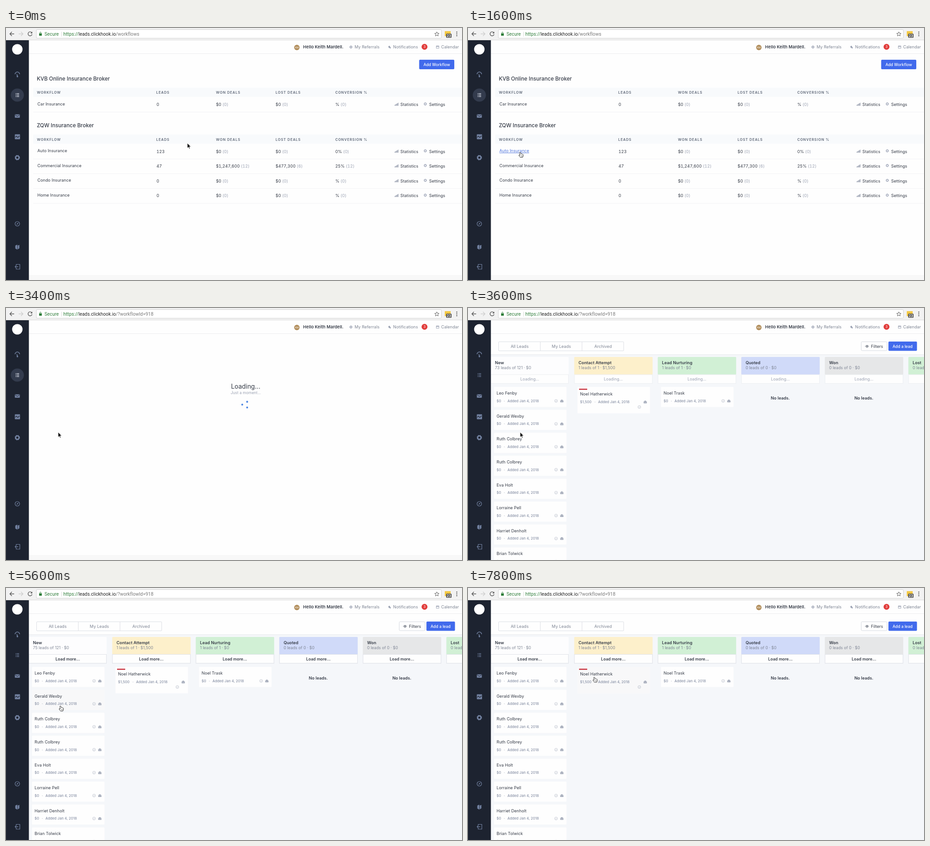
These frames come from a looping animation (1006 by 556 pixels, 8 s). An HTML page:

```html
<!DOCTYPE html>
<html lang="en">
<head>
<meta charset="utf-8">
<title>Lead workflows</title>
<style>
html, body { margin: 0; width: 100%; height: 100%; overflow: hidden; background: #fefefe; }
svg { display: block; width: 1006px; height: 556px; }
text { font-family: Inter, "Open Sans", sans-serif; font-size: 9.1px; letter-spacing: .05px; fill: #343a46; white-space: pre; }
.mid { text-anchor: middle; }
.bold { font-weight: 600; }
.grey { fill: #7d8493; }
.pale { fill: #9aa1b2; }
.white { fill: #fff; }
.num { font-variant-numeric: tabular-nums; }
.url { font-family: Roboto, sans-serif; font-size: 10.2px; letter-spacing: .06px; fill: #777; }
.secure { fill: #2e7d3a; }
.host { fill: #222; }
.hello { font-size: 9.4px; }
.badge { font-size: 7.5px; }
.tiny { font-size: 5.2px; }
.h1 { font-size: 13.8px; }
.h2 { font-size: 11.6px; font-weight: 500; }
.th { font-size: 7.6px; font-weight: 600; letter-spacing: .9px; fill: #5d6676; }
.small { font-size: 8.8px; }
.note { font-size: 8.4px; }
.count { font-size: 8.7px; }
.meta { font-size: 7.7px; font-weight: 500; fill: #8790a5; }
.btn { font-size: 8.6px; font-weight: 500; }
.hot { fill: #4a70dc; text-decoration: underline; }
.line { fill: none; stroke: #71809f; stroke-width: 1.2; }

.anim { animation: 8s step-end infinite; }
.list { animation-name: list; }
.wait { animation-name: wait; }
.board { animation-name: board; }
.before { animation-name: before; }
.after { animation-name: after; }
.hold { animation-name: hold; }
.ready { animation-name: ready; }
.newHold { animation-name: newHold; }
.newReady { animation-name: newReady; }
.link { animation-name: link; }
.card1 { animation-name: card1; }
.card0 { animation-name: card0; }
.cardC { animation-name: cardC; }
.arrow { animation-name: arrow; }
.hand { animation-name: hand; }
@keyframes list { 0% { opacity: 1 } 25%, 100% { opacity: 0 } }
@keyframes wait { 0% { opacity: 0 } 25% { opacity: 1 } 45%, 100% { opacity: 0 } }
@keyframes board { 0% { opacity: 0 } 45%, 100% { opacity: 1 } }
@keyframes before { 0% { opacity: 1 } 45%, 100% { opacity: 0 } }
@keyframes after { 0% { opacity: 0 } 25%, 100% { opacity: 1 } }
@keyframes hold { 0% { opacity: 1 } 50%, 100% { opacity: 0 } }
@keyframes ready { 0% { opacity: 0 } 50%, 100% { opacity: 1 } }
@keyframes newHold { 0% { opacity: 1 } 65%, 100% { opacity: 0 } }
@keyframes newReady { 0% { opacity: 0 } 65%, 100% { opacity: 1 } }
@keyframes link { 0% { opacity: 0 } 15%, 100% { opacity: 1 } }
@keyframes card1 { 0% { opacity: 0 } 60% { opacity: 1 } 80%, 100% { opacity: 0 } }
@keyframes card0 { 0% { opacity: 0 } 80% { opacity: 1 } 95%, 100% { opacity: 0 } }
@keyframes cardC { 0% { opacity: 0 } 95%, 100% { opacity: 1 } }
@keyframes arrow { 0% { opacity: 1 } 15% { opacity: 0 } 25% { opacity: 1 } 60%, 100% { opacity: 0 } }
@keyframes hand { 0% { opacity: 0 } 15% { opacity: 1 } 25% { opacity: 0 } 60%, 100% { opacity: 1 } }

.spin { animation: spin 8s steps(40) infinite; }
@keyframes spin { from { transform: rotate(-9deg) } to { transform: rotate(2871deg) } }

.pointer { animation: move 8s step-end infinite; }
@keyframes move {
  0% { transform: translate(400px, 254px); animation-timing-function: steps(3) }
  7.5% { transform: translate(215px, 270px); animation-timing-function: steps(3) }
  15% { transform: translate(104px, 273px); animation-timing-function: steps(2) }
  20% { transform: translate(115px, 274px) }
  57.5% { transform: translate(115px, 274px) }
  60% { transform: translate(113px, 252.5px); animation-timing-function: steps(4) }
  70% { transform: translate(120px, 260px) }
  72.5% { transform: translate(120px, 260px); animation-timing-function: steps(4) }
  82.5% { transform: translate(119.5px, 194.5px) }
  87.5% { transform: translate(119.5px, 194.5px); animation-timing-function: steps(2) }
  92.5% { transform: translate(205px, 196px) }
  95% { transform: translate(262px, 197px) }
  97.5%, 100% { transform: translate(278.5px, 196.5px) }
}
</style>
</head>
<body>
<svg id="stage" xmlns="http://www.w3.org/2000/svg" width="1006" height="556"></svg>
<script>
const text = (x, y, s, cls = '') => `<text x="${x}" y="${y}" class="${cls}">${s}</text>`;
const rect = (x, y, w, h, fill, more = '') =>
  `<rect x="${x}" y="${y}" width="${w}" height="${h}" fill="${fill}" ${more}/>`;
const disc = (x, y, r, fill, more = '') => `<circle cx="${x}" cy="${y}" r="${r}" fill="${fill}" ${more}/>`;
const path = (d, more = 'class="line"') => `<path d="${d}" ${more}/>`;
const stroke = (color, width = 1) => `fill="none" stroke="${color}" stroke-width="${width}"`;
const fill = color => `fill="${color}"`;
const at = (x, y, s) => `<g transform="translate(${x} ${y})">${s}</g>`;
const anim = (name, s) => `<g class="anim ${name}">${s}</g>`;
const gear = (x, y, r, c) => at(x, y,
  disc(0, 0, r * .68, 'none', `stroke="${c}" stroke-width="${r * .5}"`) +
  disc(0, 0, r * .88, 'none', `stroke="${c}" stroke-width="${r * .3}" stroke-dasharray="${r * .35}"`));

function toolbar() {
  const ink = '#5a5a5a', green = '#2e7d3a';
  const dots = [9, 13, 17].map(y => disc(994.5, y, 1.2, ink)).join('');
  const host = '<tspan class="secure">https://</tspan><tspan class="host">leads.clickhook.io</tspan>';
  return rect(0, 0, 1006, 27, '#f2f2f2') + rect(0, 26, 1006, 1, '#d9d9d9') +
    rect(67, 3.5, 893.5, 19, '#fff', 'rx="2" stroke="#d2d2d2"') +
    path('M18 13H9M13 8.5L8.5 13L13 17.5', stroke(ink, 1.4)) +
    path('M28 13H37M33 8.5L37.5 13L33 17.5', stroke('#cfcfcf', 1.4)) +
    path('M56.6 10A4.5 4.5 0 1 0 57.5 14', stroke(ink, 1.4)) + path('M58 8V12H54Z', fill(ink)) +
    rect(73, 12, 6, 5, green, 'rx=".5"') +
    path('M74.5 12V10.5A1.5 1.5 0 0 1 77.5 10.5V12', stroke(green)) +
    text(85, 17, 'Secure', 'url secure') + rect(122, 8, 1, 11, '#ddd') +
    anim('list', text(126.5, 17, host + '/workflows', 'url')) +
    anim('after', text(126.5, 17, host + '/?workflowId=918', 'url')) +
    path('M950.5 8.5L951.9 11.7L955.3 12L952.7 14.3L953.5 17.6L950.5 15.8L947.5 17.6L948.3 14.3L945.7 12L949.1 11.7Z',
      stroke(ink)) +
    rect(968, 7, 13, 11, '#f3c945') + rect(971, 12.5, 12, 9, '#555', 'rx="1.5"') +
    text(977, 19.8, '23', 'mid white bold badge') + dots;
}

function sidebar() {
  const c = '#71809f', back = '#1d2330';
  const rows = color => [144.7, 148, 151.3].map(y =>
    rect(21, y - .6, 1.5, 1.3, color) + rect(23.5, y - .6, 5.5, 1.3, color)).join('');
  return rect(0, 27, 50.5, 529, back) + disc(25, 47, 11.5, '#fff') +
    path('M20 102A5 5 0 0 1 30 102', stroke(c, 1.6)) +
    path('M23.5 100L26.5 106A1.7 1.7 0 1 1 23.8 106Z', fill(c)) +
    rows(c) + anim('before', disc(25, 148, 14.5, '#333b4d') + rows('#e4e8f2')) +
    rect(19.5, 190.5, 11, 7.5, c, 'rx="1"') + path('M20 191.5L25 195L30 191.5', stroke(back)) +
    rect(19.5, 234.5, 11.5, 11, c, 'rx="1"') +
    path('M20.5 241L23 238.5L26 241.5L30 238', stroke(back, 1.2)) +
    gear(25, 286, 5.6, c) +
    disc(25, 432, 5, 'none', 'class="line"') + path('M23 434.5L24.5 431L27.5 429.5L26 432.5Z', fill(c)) +
    path('M20.5 480L25 478V489L20.5 486.5Z', fill(c)) +
    path('M25.8 480L29.5 478.5V486L25.8 488.5Z', fill(c)) +
    path('M22.5 524.5V521.5H30.5V532H22.5V529M20 526.7H27M22.3 524.3L20 526.7L22.3 529');
}

function header() {
  const c = '#9aa1b2';
  return rect(50, 56, 956, 1, '#ececee') +
    disc(641.7, 43, 6, '#b28e5c') + text(641.7, 45, 'KM', 'mid white tiny') +
    text(655.5, 45.3, 'Hello Keith Mardell.', 'bold hello') +
    gear(761, 42, 3, c) + text(769, 45.3, 'My Referrals', 'grey') +
    path('M844 43.5L843.5 40.5L846 39L848 42L849 44Z', fill(c)) + disc(847.5, 44, 1.2, c) +
    text(854, 45.3, 'Notifications', 'grey') +
    disc(923.3, 41.5, 6.5, '#e13c3a') + text(923.3, 44.3, '3', 'mid white badge') +
    rect(949.3, 39.7, 5.7, 5, 'none', `stroke="${c}" stroke-width=".9"`) + rect(949, 39.5, 6, 1.7, c) +
    text(960, 45.3, 'Calendar', 'grey');
}

// Left edges of the numeric table columns
const colX = i => 200 + i * 131.6;

function row(y, name, leads, ...deals) {
  const pair = ([a, b], i) =>
    text(colX(i + 2), y + 3.5, `${a} <tspan class="pale">(${b})</tspan>`, 'num');
  return text(69.3, y + 2.2, name) + text(colX(1) + .4, y + 3.5, leads, 'num') + deals.map(pair).join('') +
    path(`M857 ${y + 3}V${y + 1.5}L866 ${y - 4}V${y + 3}Z`, fill('#b3b8c4')) +
    text(870, y + 3.5, 'Statistics') + gear(925, y - 1, 3.3, '#a9b0c0') + text(933.5, y + 3.5, 'Settings') +
    rect(60, y + 16.5, 946, 1, '#f1f2f5');
}

function table(y, title) {
  const heads = ['LEADS', 'WON DEALS', 'LOST DEALS', 'CONVERSION %'];
  return text(68, y, title, 'h2') + rect(60, y + 16, 946, 20, '#f8fafc') +
    text(68.3, y + 29.3, 'WORKFLOW', 'th') +
    heads.map((h, i) => text(colX(i + 1), y + 29.3, h, 'th')).join('');
}

function workflows() {
  const none = ['$0', 0], blank = ['%', 0];
  return rect(911.5, 70, 77.5, 21, '#416aec', 'rx="2"') + text(950.3, 84, 'Add Workflow', 'btn mid white') +
    table(115.8, 'KVB Online Insurance Broker') + row(168.5, 'Car Insurance', 0, none, none, blank) +
    table(219.2, 'ZQW Insurance Broker') +
    row(272, 'Auto Insurance', 123, none, none, ['0%', 0]) +
    row(304.4, 'Commercial Insurance', 47, ['$1,247,600', 12], ['$477,300', 6], ['25%', 12]) +
    row(337.2, 'Condo Insurance', 0, none, none, blank) +
    row(369.8, 'Home Insurance', 0, none, none, blank) +
    anim('link', rect(68, 264, 70, 13, '#fefefe') + text(69.3, 274.2, 'Auto Insurance', 'hot'));
}

function loading() {
  const dots = [15, 135, 255].map(a => `<g transform="rotate(${a})">${disc(0, -7.2, 2, '#3c7be0')}</g>`).join('');
  return text(528.8, 177.7, 'Loading...', 'mid h1') + text(529, 189.8, 'Just a moment...', 'mid pale note') +
    at(528.4, 213.2, `<g class="spin">${dots}</g>`);
}

const tick = (x, y) => at(x, y, disc(0, 0, 3.1, 'none', 'stroke="#b3b9c6" stroke-width=".8"') +
  path('M-1.3 0L-.2 1L1.4 -.8', stroke('#b3b9c6', .8)));
const mail = (x, y) => at(x, y, path('M-3.5 -1L0 -3L3.5 -1V3H-3.5Z', fill('#9da4b4')) +
  path('M-3.3 -.5L0 1L3.3 -.5', stroke('#fff', .6)));

function panel(x, y, h, hover) {
  const box = color => rect(x, y, 160, h, color, 'rx="1.5"');
  return box('#fefefe') + (hover ? anim(hover, box('#f8f8f9')) : '');
}

function card(x, y, name, hover) {
  return panel(x, y, 44.5, hover) +
    text(x + 5.7, y + 17.2, name) + text(x + 5.7, y + 33.8, '$0', 'meta') +
    text(x + 21.7, y + 33.8, '·', 'meta') + text(x + 29.7, y + 33.8, 'Added Jan 4, 2018', 'meta') +
    tick(x + 137, y + 31) + mail(x + 149.7, y + 31);
}

function column(i, title, count, color) {
  const x = 50 + i * 184.3, w = i ? 173 : 172, cx = x + 86.3, first = i === 0;
  const sub = s => text(x + 9.5, 135.3, s, 'grey count');
  const [hold, ready] = first ? ['newHold', 'newReady'] : ['hold', 'ready'];
  return rect(x, 108, w, 39, color, 'rx="1.5"') + text(x + 9.5, 123.6, title, 'bold') +
    (first ? anim(hold, sub('73' + count)) + anim(ready, sub('75' + count)) : sub(count)) +
    rect(x + .5, 147, w - 1, 19.5, '#fefefe', 'stroke="#eceef2"') +
    anim(hold, text(cx, 159.6, 'Loading...', 'small mid pale')) +
    anim(ready, rect(x + .5, 146.5, w - 1, 19.5, '#fefefe', 'stroke="#dfe2e8"') +
      text(cx, 159.6, 'Load more...', 'small mid bold'));
}

function leads() {
  const names = ['Leo Fenby', 'Gerald Wexby', 'Ruth Colbrey', 'Ruth Colbrey', 'Eva Holt', 'Lorraine Pell',
    'Harriet Denholt', 'Brian Tolwick'];
  const hovers = ['card0', 'card1'];
  const edge = '#dcdfe5';
  const columns = [
    ['New', ' leads of 121 · $0', '#fdfdfe'],
    ['Contact Attempt', '1 leads of 1 · $1,500', '#fdf0cb'],
    ['Lead Nurturing', '1 leads of 1 · $0', '#d1f0d5'],
    ['Quoted', '0 leads of 0 · $0', '#d0daf9'],
    ['Won', '0 leads of 0 · $0', '#e6e7e8'],
    ['Lost', '0 leads of 0 · $0', '#d1f0d5']];
  return rect(50, 57, 956, 46, '#fefefe') + rect(50, 103, 956, 453, '#f5f7fa') + rect(50, 102.5, 956, 1, '#e6e8ec') +
    rect(67.5, 74.5, 276, 20, '#fefefe', `rx="1.5" stroke="${edge}"`) +
    rect(159, 74.5, 1, 20, edge) + rect(251, 74.5, 1, 20, edge) +
    ['All Leads', 'My Leads', 'Archived'].map((s, i) => text(114 + i * 92, 87.8, s, 'mid grey')).join('') +
    rect(867.5, 74.5, 57, 19.5, '#fefefe', 'rx="2" stroke="#d5d9e0"') +
    path('M876.5 84.5Q880.3 80 884 84.5Q880.3 89 876.5 84.5Z', stroke('#555c6a')) +
    disc(880.3, 84.5, 1.3, '#555c6a') + text(889, 87.7, 'Filters') +
    rect(927.5, 74, 63, 20.5, '#416aec', 'rx="2"') + text(958.8, 87.6, 'Add a lead', 'btn mid white') +
    columns.map((c, i) => column(i, ...c)).join('') +
    names.map((n, i) => card(57.3, 174 + i * 50.6, n, hovers[i])).join('') +
    panel(241.5, 174, 58.5, 'cardC') +
    rect(245, 178, 18, 2.5, '#c9333f') + text(247.2, 193.3, 'Noel Hatherwick') +
    text(247.2, 209.9, '$1,500', 'meta') + text(279, 209.9, '·', 'meta') +
    text(287, 209.9, 'Added Jan 4, 2018', 'meta') + mail(391, 207.2) + tick(378, 218.5) +
    card(425.8, 174, 'Noel Trask') +
    text(689, 202, 'No leads.', 'mid bold') + text(873.3, 202, 'No leads.', 'mid bold');
}

function pointer() {
  const arrow = path('M0 0V11.2L2.6 8.8L4.2 12.5L6 11.7L4.4 8.1H7.8Z', 'fill="#111" stroke="#fff" stroke-width=".8"');
  const hand = path('M-1.3 1Q0 -.6 1.1 1L2 4Q3.2 3.2 4 4.2Q5 3.6 5.5 4.7Q6.7 4.5 6.8 6L6.5 9L5.5 11.5H.3L-2.3 8Q-3.4 6.3 -2.2 6L-.2 7Z',
    'fill="#fff" stroke="#222" stroke-width=".9" stroke-linejoin="round"') +
    path('M2 7.5V9.5M3.5 7.5V9.5M5 7.5V9.5', stroke('#222', .6));
  return `<g class="pointer">${anim('arrow', arrow)}${anim('hand', hand)}</g>`;
}

document.getElementById('stage').innerHTML =
  rect(0, 0, 1006, 556, '#fefefe') + rect(50, 545, 956, 11, '#f8f8f8') +
  anim('list', workflows()) + anim('wait', loading()) + anim('board', leads()) +
  header() + sidebar() + toolbar() + pointer();
</script>
</body>
</html>
```
